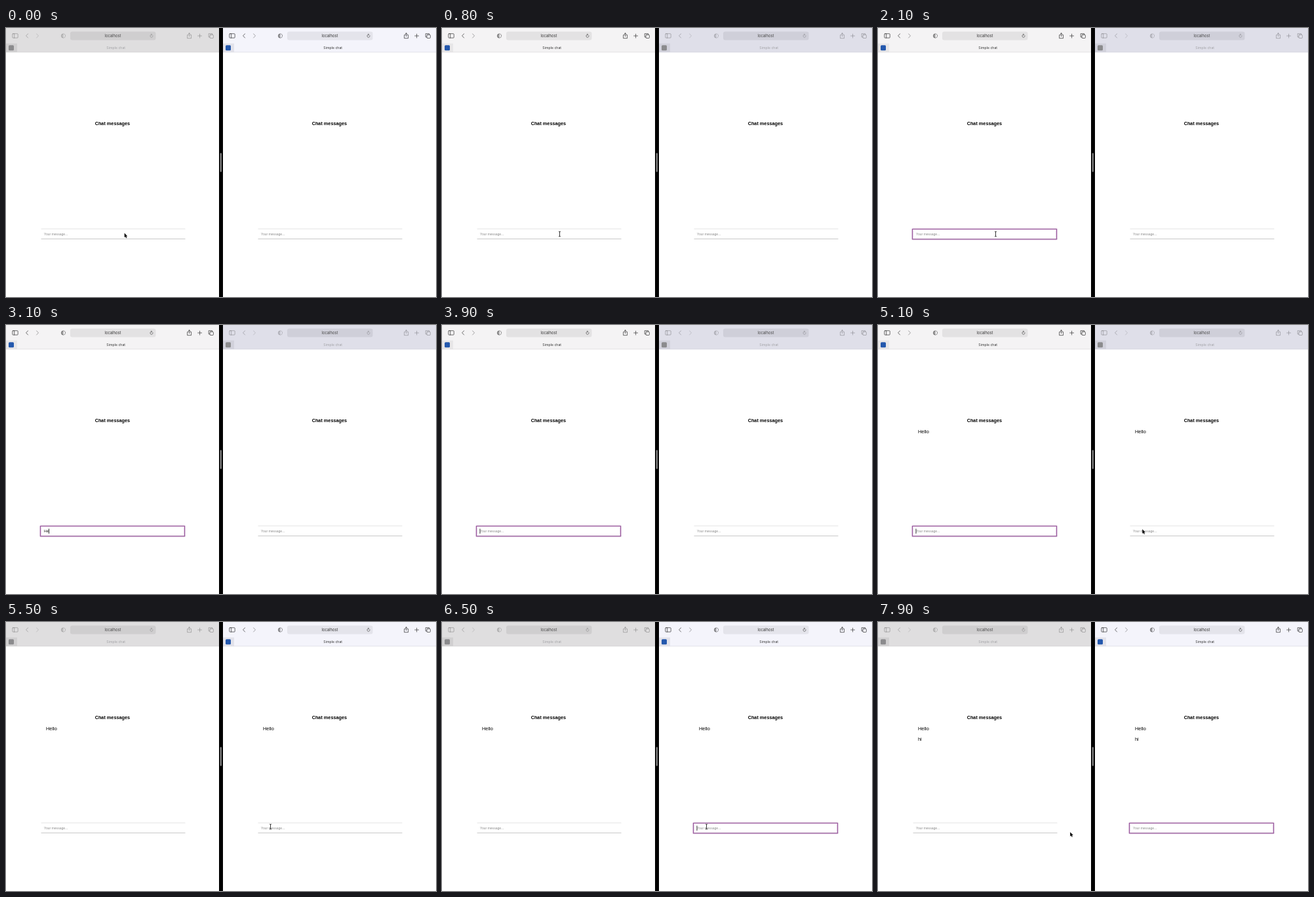
Recreate the animation shown at these times as an HTML page with a canvas. Size 656 by 410 pixels, loop 8 s.

```html
<!DOCTYPE html>
<html lang="en">
<head>
<meta charset="utf-8">
<title>Simple chat</title>
<style>
html, body { margin: 0; width: 656px; height: 410px; overflow: hidden; background: #fff; }
canvas { display: block; }
</style>
</head>
<body>
<canvas id="stage" width="656" height="410"></canvas>
<script>
const ctx = document.getElementById('stage').getContext('2d');
const LOOP = 8000, STEP = 100, RIGHT = 331;
const SANS = '"Liberation Sans", Arial, sans-serif';
const UI = 'Inter, sans-serif';

const themes = {
  left: {
    on: { bar: '#f4f3f4', pill: '#e3e2e3', tab: '#e7e6e7', edge: '#dddcdd' },
    off: { bar: '#dfdedf', pill: '#cfcecf', tab: '#d0cfd0', edge: '#d4d3d4' }
  },
  right: {
    on: { bar: '#f4f4fb', pill: '#e4e4eb', tab: '#e2e2ea', edge: '#dcdce4' },
    off: { bar: '#dfdfe9', pill: '#cfcfd9', tab: '#d1d1db', edge: '#d3d3dd' }
  }
};

const between = (t, a, b) => t >= a && t < b;
const ramp = (t, a, b) => Math.max(0, Math.min(1, (t - a) / (b - a)));
const ease = k => k * k * (3 - 2 * k);
const mix = (a, b, k) => a + (b - a) * k;

function rect(x, y, w, h, color, radius = 0) {
  ctx.fillStyle = color;
  ctx.beginPath();
  ctx.roundRect(x, y, w, h, radius);
  ctx.fill();
}

function frame(x, y, w, h, radius = 0) {
  ctx.beginPath();
  ctx.roundRect(x, y, w, h, radius);
  ctx.stroke();
}

function path(...points) {
  ctx.beginPath();
  points.forEach(([x, y]) => ctx.lineTo(x, y));
  ctx.stroke();
}

function text(str, x, y, font, color, align = 'left') {
  ctx.font = font;
  ctx.fillStyle = color;
  ctx.textAlign = align;
  ctx.fillText(str, x, y);
}

function toolbarIcons(active) {
  const strong = active ? 0.72 : 0.3;
  ctx.save();
  ctx.strokeStyle = ctx.fillStyle = '#222';
  ctx.lineWidth = 0.9;
  ctx.lineCap = ctx.lineJoin = 'round';
  ctx.globalAlpha = strong;
  // sidebar
  frame(9.8, 8.7, 8.4, 6.4, 1);
  path([12.7, 8.7], [12.7, 15.1]);
  // history
  path([33.5, 8.8], [30.6, 11.9], [33.5, 15]);
  ctx.globalAlpha = strong * 0.6;
  path([46.6, 8.8], [49.5, 11.9], [46.6, 15]);
  // privacy shield
  ctx.beginPath();
  ctx.arc(87.5, 12, 3.2, 0, Math.PI * 2);
  ctx.stroke();
  ctx.beginPath();
  ctx.arc(87.5, 12, 3.2, Math.PI / 2, Math.PI * 1.5);
  ctx.fill();
  ctx.globalAlpha = strong;
  // reload
  ctx.lineWidth = 0.7;
  ctx.beginPath();
  ctx.arc(222, 12.2, 2.1, -0.4, Math.PI * 1.55);
  ctx.stroke();
  path([221.5, 8.9], [222.7, 10.1], [221.5, 11]);
  ctx.lineWidth = 0.9;
  // share
  path([278.2, 10.6], [276.6, 10.6], [276.6, 15.7], [282.6, 15.7], [282.6, 10.6], [281, 10.6]);
  path([279.6, 13], [279.6, 7.8]);
  path([278, 9.3], [279.6, 7.7], [281.2, 9.3]);
  // new tab
  path([292.6, 12], [298.6, 12]);
  path([295.6, 9], [295.6, 15]);
  // tab overview
  path([311, 13.8], [309.2, 13.8], [309.2, 8.6], [314.6, 8.6], [314.6, 10.2]);
  frame(311, 10.3, 5.4, 5.2, 1);
  ctx.restore();
}

function browserBar(theme, active) {
  const c = active ? theme.on : theme.off;
  rect(0, 0, 325, 37, c.bar);
  rect(0, 23.5, 17, 13.5, c.tab);
  rect(0, 36.5, 325, 0.7, c.edge);
  rect(98, 5.5, 130.5, 13, c.pill, 3);
  toolbarIcons(active);
  text('localhost', 163, 14.1, '5.8px ' + UI, active ? '#333' : '#444', 'center');
  text('Simple chat', 167.7, 32.1, '5.2px ' + UI, active ? '#333' : '#a2a2a6', 'center');
  rect(4, 26.3, 8, 8, active ? '#2458ad' : '#8b8b8d', 1.5);
}

function inputBox({ typed, focus, caret }) {
  const x = 52.5, y = 306.5, w = 220, h = 15.5;
  rect(x + 1, 305.8, w, 0.8, '#dcdcdc');
  rect(x + 1, 321, w, 0.9, '#c9c9c9');
  if (focus > 0) {
    ctx.save();
    ctx.globalAlpha = focus;
    ctx.strokeStyle = 'rgba(160,95,165,0.3)';
    ctx.lineWidth = 2.4;
    frame(x, y, w, h, 0.5);
    ctx.strokeStyle = '#9c5d9f';
    ctx.lineWidth = 1.2;
    frame(x, y, w, h);
    ctx.restore();
  }
  const font = '5.05px ' + SANS;
  text(typed || 'Your message...', 58, 316, font, typed ? '#111' : '#8c8c8c');
  if (caret) {
    const width = typed ? ctx.measureText(typed).width : 0;
    rect(57.5 + width, 310.5, 0.9, 7.5, '#222');
  }
}

function chatWindow(x, theme, state) {
  ctx.save();
  ctx.translate(x, 0);
  browserBar(theme, state.active);
  text('Chat messages', 162.4, 147.5, 'bold 7.3px ' + SANS, '#000', 'center');
  state.messages.forEach((m, i) => text(m, 61, 165.4 + i * 15.4, '7.35px ' + SANS, '#000'));
  inputBox(state);
  ctx.restore();
}

function arrow(x, y) {
  const outline = [[0, 0], [0, 6.6], [1.5, 5.3], [2.5, 7.6], [3.6, 7.1], [2.6, 4.9], [4.6, 4.8]];
  ctx.save();
  ctx.translate(x, y);
  ctx.beginPath();
  outline.forEach(p => ctx.lineTo(...p));
  ctx.closePath();
  ctx.strokeStyle = '#fff';
  ctx.lineWidth = 1.2;
  ctx.stroke();
  ctx.fillStyle = '#000';
  ctx.fill();
  ctx.restore();
}

function iBeam(x, y) {
  ctx.strokeStyle = '#222';
  ctx.lineWidth = 0.9;
  path([x, y - 3.6], [x, y + 3.6]);
  for (const s of [-1, 1]) path([x - 1.5, y + 4 * s], [x, y + 3.4 * s], [x + 1.5, y + 4 * s]);
}

function pointer(t) {
  if (t < 800) {
    const k = ease(ramp(t, 0, 400));
    arrow(mix(180.7, 179.4, k), mix(312.6, 311.5, k));
  } else if (t < 2500) {
    iBeam(179.5, 314);
  } else if (between(t, 4400, 5200)) {
    const k = ease(ramp(t, 4300, 4900));
    const x = mix(179.5, 403.3, k), y = mix(314, 311.3, k);
    x < 273 ? iBeam(x, y) : arrow(x, y);
  } else if (between(t, 5200, 6600)) {
    iBeam(403.5, 312);
  } else if (t >= 7800) {
    t < 7900 ? arrow(398, 312) : arrow(293.2, 320.2);
  }
}

function typedBy(t, word, times, sentAt) {
  return t < sentAt ? word.slice(0, times.filter(k => t >= k).length) : '';
}

function draw(t) {
  const leftActive = between(t, 800, 5200);
  const messages = [];
  if (t >= 4000) messages.push('Hello');
  if (t >= 7400) messages.push('hi');

  rect(0, 0, 656, 410, '#fff');
  chatWindow(0, themes.left, {
    active: leftActive,
    messages,
    typed: typedBy(t, 'Hello', [2500, 2600, 3100, 3200, 3400], 3900),
    focus: leftActive ? ramp(t, 1400, 1800) : 0,
    caret: between(t, 1800, 2100) || between(t, 2500, 5200)
  });
  chatWindow(RIGHT, themes.right, {
    active: !leftActive,
    messages,
    typed: typedBy(t, 'hi', [6600, 6800], 7300),
    focus: ramp(t, 5500, 5700),
    caret: between(t, 5700, 6100) || between(t, 6400, 7800)
  });

  rect(325, 0, 6, 410, '#000');
  rect(326.7, 190.5, 2.2, 29, '#8c8c8c', 1.1);
  pointer(t);
}

const start = performance.now();
function tick() {
  const t = (performance.now() - start) % LOOP;
  draw(Math.floor(t / STEP) * STEP);
  requestAnimationFrame(tick);
}
tick();
</script>
</body>
</html>
```
